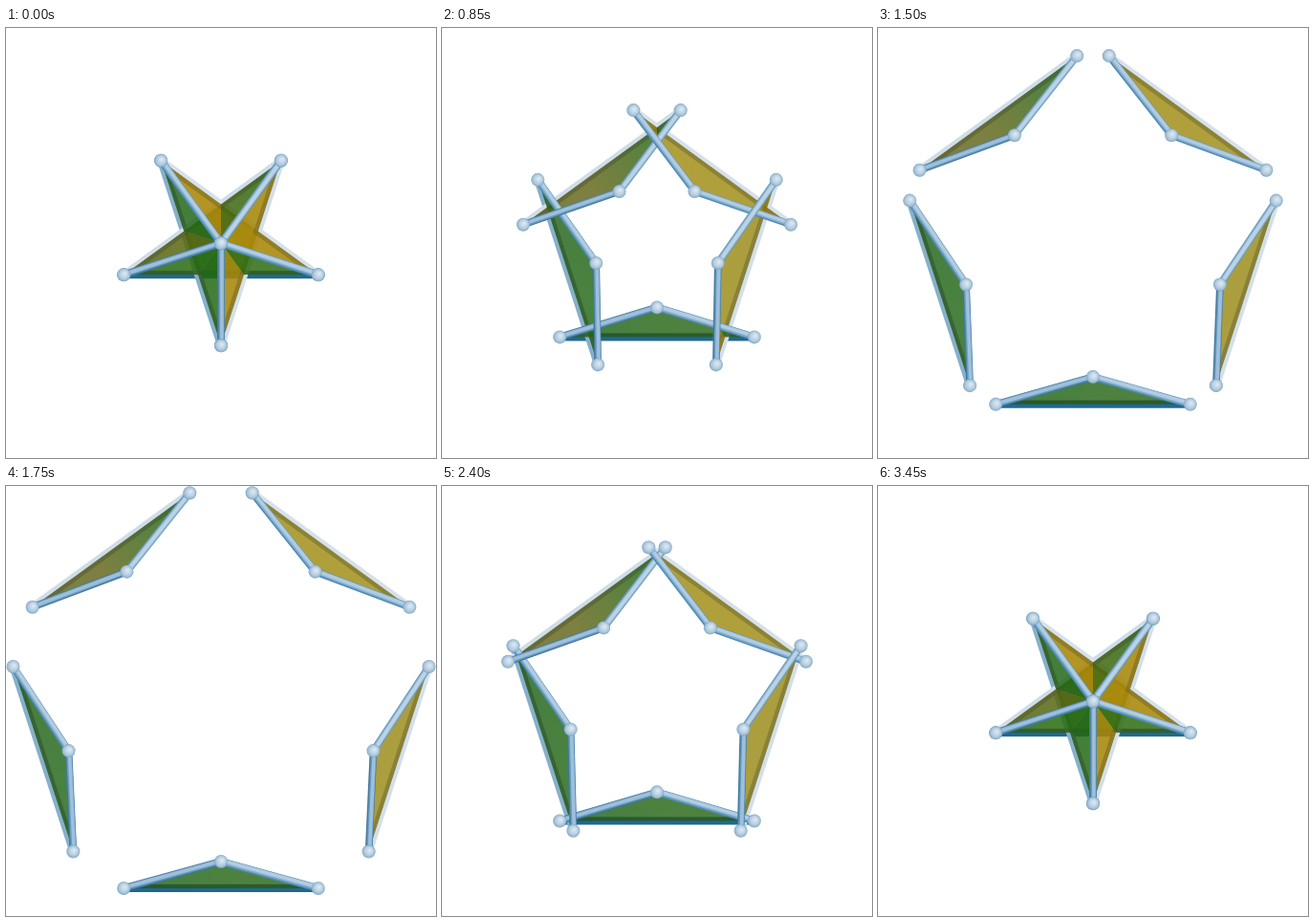
An HTML page with a canvas for the animation above (3.5 s loop, 450 px wide and 450 px high).

```html
<!DOCTYPE html>
<html>
<head>
<meta charset="utf-8">
<style>
html, body { margin: 0; width: 100%; height: 100%; overflow: hidden; background: #fff; }
canvas { display: block; }
</style>
</head>
<body>
<canvas id="stage" width="450" height="450"></canvas>
<script>
const ctx = document.getElementById('stage').getContext('2d');
const CX = 225, CY = 225.3, RADIUS = 107;
const LOOP = 3500, STEP = 50, HOLD = 250;
const BASE_SPEED = 0.1084, APEX_SPEED = 0.1118; // nearer points travel slightly further
const RAD = Math.PI / 180;

// Clockwise from the bottom piece; each face is shaded from its first corner to its second.
const pieces = [
  { face: ['rgb(34,98,16)', 'rgb(24,96,18)'], tip: 'rgba(70,128,15,.25)', rim: '#20688f' },
  { face: ['rgb(28,98,16)', 'rgb(26,94,18)'], tip: 'rgba(50,120,30,.2)', rim: '#86b0c9' },
  { face: ['rgb(92,96,16)', 'rgb(32,98,16)'], tip: 'rgba(75,118,15,.25)', rim: '#cfdde8' },
  { face: ['rgb(156,136,11)', 'rgb(156,136,11)'], tip: 'rgba(184,132,0,.4)', rim: '#d6e1ea' },
  { face: ['rgb(150,134,15)', 'rgb(150,134,15)'], tip: 'rgba(184,136,0,.4)', rim: '#d3dfe9' }
].map((piece, i) => ({ ...piece, angle: 90 + 72 * i }));

const polar = (r, deg, x = CX, y = CY) => [x + r * Math.cos(deg * RAD), y + r * Math.sin(deg * RAD)];

function trace(points) {
  ctx.beginPath();
  points.forEach(p => ctx.lineTo(...p));
  ctx.closePath();
}

function line(a, b, width, color, shift = 0) {
  ctx.lineWidth = width;
  ctx.strokeStyle = color;
  ctx.beginPath();
  ctx.moveTo(a[0] + shift, a[1] - shift);
  ctx.lineTo(b[0] + shift, b[1] - shift);
  ctx.stroke();
}

// Rods sloping towards the upper right catch more light.
function rod(apex, corner) {
  const dx = corner[0] - apex[0], dy = corner[1] - apex[1];
  const light = 0.5 + (0.6 * dx - 0.8 * dy) / Math.hypot(dx, dy) / 2;
  line(apex, corner, 7.6, `hsl(204 42% ${42 + 14 * light}%)`);
  line(apex, corner, 5.8, `hsl(206 42% ${58 + 12 * light}%)`, 0.5);
  line(apex, corner, 3.6, `hsl(207 44% ${73 + 9 * light}%)`, 0.9);
}

function ball([x, y]) {
  const shade = ctx.createRadialGradient(x + 1.2, y - 1.5, 0.5, x, y, 7.2);
  shade.addColorStop(0, '#dce8f1');
  shade.addColorStop(0.55, '#b9d0e2');
  shade.addColorStop(0.85, '#98b8d0');
  shade.addColorStop(1, '#6f9bbb');
  ctx.fillStyle = shade;
  ctx.beginPath();
  ctx.arc(x, y, 7, 0, 2 * Math.PI);
  ctx.fill();
}

// Draws the part of a face inside its own 72 degree sector, or the tips beyond it.
function face({ angle, face: [from, to], tip, left, right, apex }, isTip) {
  ctx.save();
  trace([[CX, CY], polar(900, angle - 36), polar(900, angle + 36)]);
  if (isTip) ctx.rect(-50, -50, 550, 550);
  ctx.clip('evenodd');
  trace([right, left, apex]);
  ctx.clip();
  const shade = ctx.createLinearGradient(...right, ...left);
  shade.addColorStop(0.4, from);
  shade.addColorStop(0.85, to);
  ctx.globalAlpha = 0.8;
  ctx.fillStyle = shade;
  ctx.fill();
  ctx.globalAlpha = 1;
  if (isTip) {
    ctx.fillStyle = tip;
    ctx.fill();
  }
  line(left, right, 9, 'rgba(70,70,45,.28)');
  ctx.restore();
}

function draw(time) {
  const travel = Math.max(0, LOOP / 2 - HOLD - Math.abs(time - LOOP / 2));
  ctx.fillStyle = '#fff';
  ctx.fillRect(0, 0, 450, 450);
  for (const p of pieces) {
    const base = polar(travel * BASE_SPEED, p.angle);
    p.apex = polar(travel * APEX_SPEED, p.angle);
    p.right = polar(RADIUS, p.angle - 72, ...base);
    p.left = polar(RADIUS, p.angle + 72, ...base);
  }
  pieces.forEach(p => line(p.left, p.right, 8, p.rim));
  // Faces slope away from the viewer, so tips lie in front of the neighbouring faces.
  pieces.forEach(p => face(p, false));
  pieces.forEach(p => face(p, true));
  for (const p of pieces) {
    rod(p.apex, p.left);
    rod(p.apex, p.right);
  }
  for (const p of pieces) [p.left, p.right, p.apex].forEach(ball);
}

const start = performance.now();
function tick() {
  const time = (performance.now() - start) % LOOP;
  draw(Math.floor(time / STEP) * STEP);
  requestAnimationFrame(tick);
}
tick();
</script>
</body>
</html>
```
